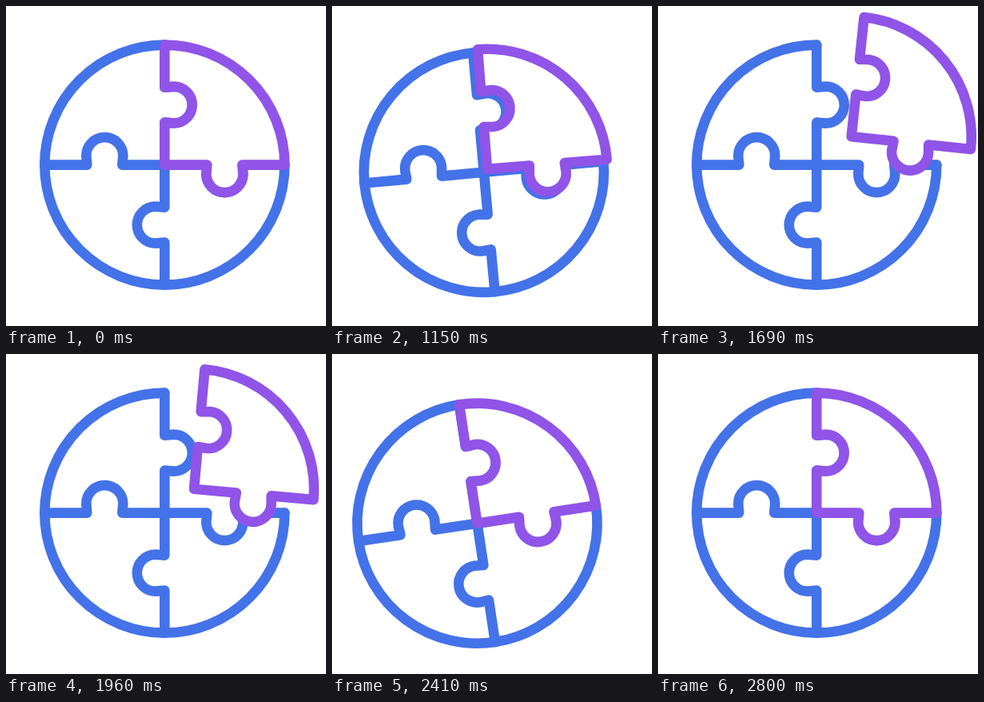
Write an HTML page that moves like this. It is 400x400 px and loops after 2830 ms.

```html
<!DOCTYPE html>
<html lang="en">
<head>
<meta charset="utf-8">
<title>Puzzle</title>
<style>
  html, body { margin: 0; width: 100%; height: 100%; overflow: hidden; background: #fff; }
  svg { display: block; width: 100%; height: 100%; }
  #puzzle { fill: none; stroke: #4472e8; stroke-width: 12.6; stroke-linecap: round; stroke-linejoin: round; }
  #piece { fill: #fff; stroke: #9054e8; }
</style>
</head>
<body>
<svg viewBox="0 0 400 400">
  <defs>
    <path id="arm" d="M0 0V-53L11.5 -52A23 23 0 0 0 11.5 -98L0 -97V-150"/>
  </defs>
  <g id="puzzle">
    <path d="M0 -150A150 150 0 1 0 150 0"/>
    <use href="#arm"/>
    <use href="#arm" transform="rotate(90)"/>
    <use href="#arm" transform="rotate(180)"/>
    <use href="#arm" transform="rotate(270)"/>
    <path id="piece" d="M0 0V-53L11.5 -52A23 23 0 0 0 11.5 -98L0 -97V-150
      A150 150 0 0 1 150 0H97L98 11.5A23 23 0 0 1 52 11.5L53 0Z"/>
  </g>
</svg>
<script>
const LOOP = 2830, START = 1000, STEP = 30;
const CENTER = { x: 198.3, y: 198.6 };
const puzzle = document.getElementById('puzzle');
const piece = document.getElementById('piece');

function bezier(x1, y1, x2, y2) {
  const at = (a, b, s) => 3 * (1 - s) * (1 - s) * s * a + 3 * (1 - s) * s * s * b + s * s * s;
  return u => {
    let low = 0, high = 1;
    for (let i = 0; i < 24; i++) {
      const mid = (low + high) / 2;
      if (at(x1, x2, mid) < u) low = mid; else high = mid;
    }
    return at(y1, y2, low);
  };
}

const smooth = u => u * u * (3 - 2 * u);
const pull = bezier(0.33, 0.2, 0.67, 1);
const launch = bezier(0.1, 0.2, 0.2, 1);
const settle = bezier(0.33, 0, 0.3, 1);

function ramp(t, from, to, ease) {
  return ease(Math.min(1, Math.max(0, (t - from) / (to - from))));
}

function place(el, x, y, angle) {
  el.setAttribute('transform', `translate(${x} ${y}) rotate(${angle})`);
}

function draw(time) {
  const t = START + STEP * Math.floor((time - START) / STEP);
  const windUp = ramp(t, 1000, 1110, pull) - ramp(t, 1110, 1250, smooth);
  const impact = ramp(t, 2140, 2350, smooth) - ramp(t, 2350, 2800, settle);
  const away = 1.01 * (ramp(t, 1130, 1630, launch) - ramp(t, 1870, 2232, smooth));

  place(puzzle,
    CENTER.x - 10.5 * windUp - 18 * impact,
    CENTER.y + 11.5 * windUp + 14 * impact,
    -6.5 * windUp - 9.2 * impact);
  place(piece, 43 * away, -35 * away, 6 * away);
}

const origin = performance.now();
function tick() {
  draw((performance.now() - origin) % LOOP);
  requestAnimationFrame(tick);
}
tick();
</script>
</body>
</html>
```
